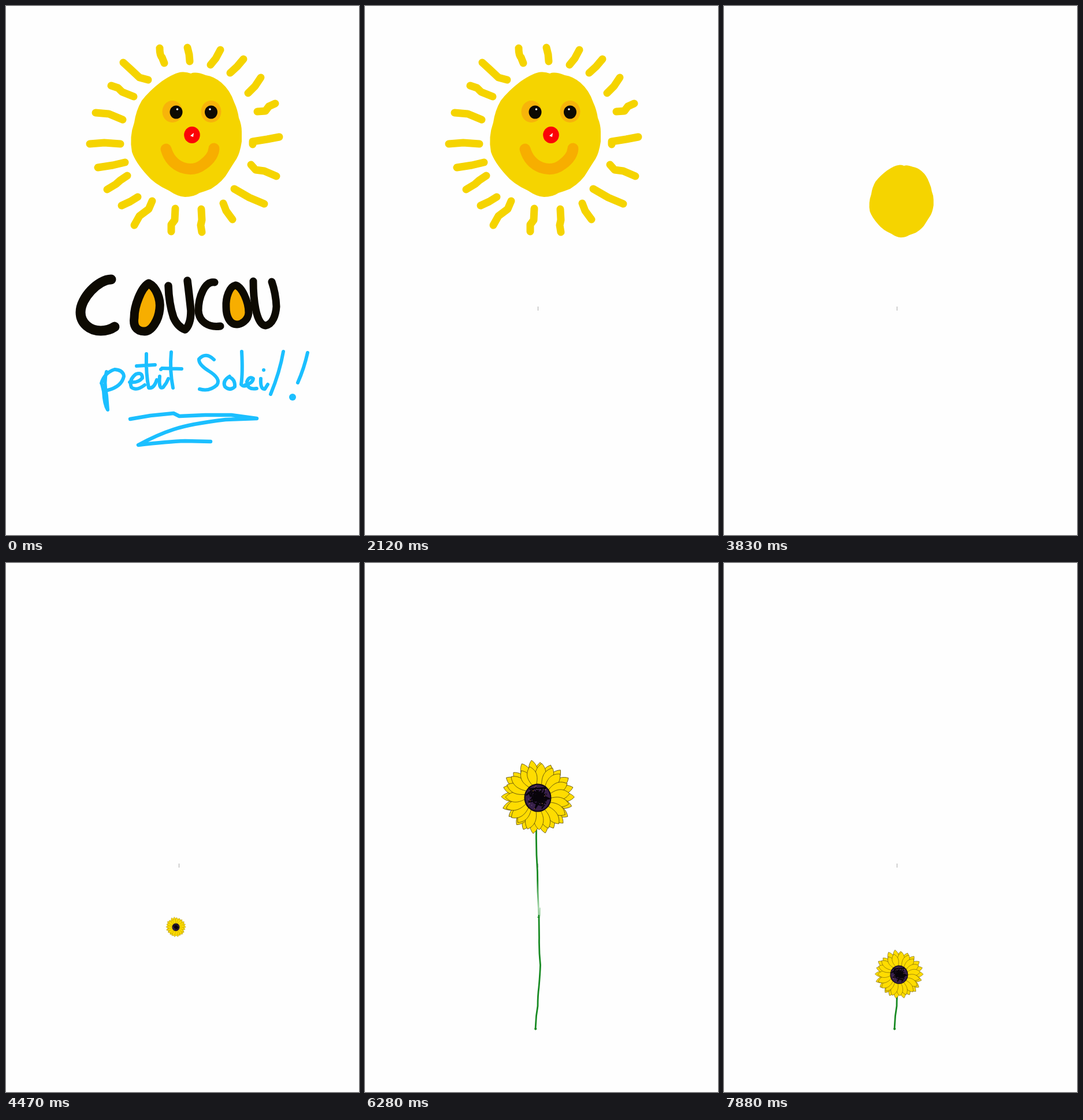
Animation of 611x917 px, one loop 7.99 s. Source, as an HTML page with a canvas:

```html
<!DOCTYPE html>
<html lang="fr">
<head>
<meta charset="utf-8">
<title>Coucou petit soleil</title>
<style>
html, body { margin: 0; width: 100%; height: 100%; overflow: hidden; background: #fefefe; }
canvas { display: block; width: 611px; height: 917px; }
</style>
</head>
<body>
<canvas id="stage" width="611" height="917"></canvas>
<script>
const ctx = document.getElementById('stage').getContext('2d');
const LOOP = 7990, STEP = LOOP / 75;
const YELLOW = '#f5d400', ORANGE = '#f7ae00', INK = '#0d0a02', BLUE = '#1bbfff', GREEN = '#178a22';

const disk = new Path2D('M305 114.5Q313 114 320 117Q328 113 346 120Q360 122 373 133Q388 146 395 167Q401 180 403 194' +
  'Q408 206 408 218V235Q405 255 399 265Q393 274 385 287Q376 304 355 317Q345 321 335 324Q325 331 310 331' +
  'Q298 331 282 320Q256 308 244 293Q224 271 218 253Q213 227 222 202Q225 181 235 164Q248 147 269 131Q292 115 305 114.5Z');

// Clockwise from the top left
const rays = [
  'M266 73Q266 86 270 89L274 99', 'M314 72L317 84L318 96', 'M371 76L363 91L354 102', 'M411 92L400 105L388 116',
  'M441 124L431 139L419 151', 'M466 169L455 174L449 182L435 183', 'M473 227L452 231L427 235L427 240',
  'M424 275L432 284L447 286L468 295', 'M395 317L421 332L447 343', 'M376 342L381 355L392 370',
  'M338 352L339 371L337 380L339 392', 'M293 351L292 371L286 379L286 391', 'M253 338L247 352L231 364L222 380',
  'M228 331L215 339L200 346', 'M210 294L198 302L190 309L175 318', 'M206 271L185 276L159 280',
  'M198 239L170 237L145 239', 'M202 197L178 187L155 185', 'M221 157L201 149L194 142L182 138', 'M246 128L231 124L215 109L203 98'
].map(d => new Path2D(d));

// path, line width, step at which it is rubbed out, filled inside
const letters = [
  ['M182 474C160 474 129 506 129 531C129 550 145 563 164 563Q178 563 188 556', 17, 19],
  ['M247 481C260 487 268 508 266 525C264 545 252 564 240 564C224 564 220 553 222 540C222 520 234 488 247 481Z', 15, 18, true],
  ['M281 485Q282 516 290 540Q297 556 310 561Q320 552 320 528Q317 500 314 476', 13.5, 17],
  ['M361 479C344 476 333 505 333 528C334 548 352 558 371 555', 13, 15],
  ['M397 484C408 486 420 512 420 532C419 546 406 552 400 552C386 552 381 536 381 522C380 505 387 486 397 484Z', 13, 13, true],
  ['M428 477C428 505 432 552 449 554C462 552 467 535 468 521Q467 498 460 478', 13, 11]
].map(([d, w, off, fill]) => ({ path: new Path2D(d), w, off, fill }));

const script = [
  ['M174 634Q169 650 174 675L176 700Q170 690 169 668Q166 655 165 654Q170 636 188 630Q203 631 204 642Q200 660 176 666', 7],
  ['M214 652Q228 654 236 645Q236 634 225 638Q212 648 217 661Q226 668 240 657', 7],
  ['M243 603Q242 638 247 662Q256 664 261 648M226 624L258 622', 7],
  ['M266 642Q264 666 272 661Q278 654 281 646M268 630h.1', 7],
  ['M286 600Q283 632 289 662M270 628L304 629', 7],
  ['M360 613Q346 599 334 612Q333 621 350 632Q373 646 365 657Q352 669 335 664', 8],
  ['M387 642Q374 650 379 660Q388 668 396 660Q397 647 386 643', 8],
  ['M408 599Q410 636 407 656Q411 661 419 657', 8],
  ['M414 657Q427 654 428 646Q421 641 417 651Q417 666 434 663', 8],
  ['M441 646Q440 665 448 664L453 656M446 631h.1', 8],
  ['M480 599Q474 634 458 673', 9],
  ['M522 601Q516 628 505 653', 10]
].map(([d, off]) => ({ path: new Path2D(d), off }));

const underline = new Path2D('M215 716L250 710L290 706L300 711L345 709L390 709L434 715L380 717Q320 724 290 734Q262 743 229 761Q280 755 310 754L354 755');
const underlineLength = 565;
const smile = new Path2D('M277 248Q284 272 305 280Q325 287 341 275Q359 262 360 247');
const brows = new Path2D('M276 158L288 147Q293 144 297 146M345 147Q360 149 368 160');
const stem = new Path2D('M295 808L296.5 785L299 768Q299 750 301 735Q303 712 303.5 697Q301 672 301.5 650L301 612L299 570L298.5 535Q296 500 296.5 466V400');

// step, x, y, radius
const track = [
  [31, 312, 222, 100], [32, 314, 226, 95], [36, 307, 338, 58], [40, 297, 516, 17], [42, 294, 631, 17],
  [44, 294, 745, 19], [46, 296, 828, 22], [48, 297, 760, 28], [50, 304, 713, 38], [53, 308.5, 643, 46],
  [56, 306, 540, 55], [59, 299, 406, 62], [65, 299, 406, 62], [68, 304, 540, 54], [72, 307, 674, 47], [74, 303, 713, 41]
];

function pose(step) {
  const i = Math.max(1, track.findIndex(k => k[0] >= step));
  const a = track[i - 1], b = track[i], p = (step - a[0]) / (b[0] - a[0]);
  return [1, 2, 3].map(j => a[j] + (b[j] - a[j]) * p);
}

function seeded(seed) {
  return () => (seed = (seed * 16807) % 2147483647) / 2147483647;
}

function stroke(path, color, width) {
  ctx.strokeStyle = color;
  ctx.lineWidth = width;
  ctx.stroke(path);
}

function dot(x, y, rx, color, ry = rx) {
  ctx.fillStyle = color;
  ctx.beginPath();
  ctx.ellipse(x, y, rx, ry, 0, 0, Math.PI * 2);
  ctx.fill();
}

function drawEye(x, px) {
  dot(x, 183, 17.5, '#f7b40a', 19);
  dot(px, 184, 11, INK, 11.5);
  dot(px + (px < 320 ? 2 : -2), 179, 1.8, '#fff');
}

function drawFace(step) {
  if (step < 24) stroke(smile, ORANGE, 19);
  if (step < 22) drawEye(288, 294.5);
  if (step < 21) drawEye(355, 355);
  if (step < 23) {
    dot(322, 223.5, 13.8, '#fb0407', 14.5);
    ctx.fillStyle = '#fff';
    ctx.fill(new Path2D('M319 225L325 220L324 227Z'));
  }
  if (step >= 5 && step < 20) stroke(brows, '#1fc0e6', 5);
}

function drawWords(step) {
  for (const l of letters) {
    if (step >= l.off) continue;
    if (l.fill) { ctx.fillStyle = ORANGE; ctx.fill(l.path); }
    stroke(l.path, INK, l.w);
  }
  for (const s of script) if (step < s.off) stroke(s.path, BLUE, 6);
  if (step < 10) dot(496, 678, 6, BLUE);
  if (step < 6) {
    ctx.setLineDash([underlineLength * (1 - step / 6), 2000]);
    stroke(underline, BLUE, 6.5);
    ctx.setLineDash([]);
  }
}

function drawSun(step) {
  rays.forEach((ray, i) => {
    if (step < 30 - i * 0.28) stroke(ray, YELLOW, 13);
  });
  ctx.fillStyle = YELLOW;
  ctx.fill(disk);
}

function petal(angle, length, width) {
  ctx.save();
  ctx.rotate(angle);
  ctx.beginPath();
  ctx.moveTo(16, 0);
  ctx.bezierCurveTo(30, -width, length - 12, -width * 1.5, length, 0);
  ctx.bezierCurveTo(length - 12, width * 1.5, 30, width, 16, 0);
  ctx.fill();
  ctx.stroke();
  ctx.restore();
}

function drawFlower(x, y, r) {
  const rnd = seeded(77);
  ctx.save();
  ctx.translate(x, y);
  ctx.scale(r / 62, r / 62);
  ctx.strokeStyle = '#5a4c10';
  ctx.lineWidth = 0.8;
  dot(0, 0, 48, '#ffdc00');
  for (const [count, reach] of [[22, 60], [19, 54]]) {
    for (let i = 0; i < count; i++) {
      petal((i + rnd() * 0.3) / count * Math.PI * 2 - 1.5, reach + rnd() * 5, 8.5 + rnd());
    }
  }

  // Scribbled heart
  dot(0, 1, 23.5, '#120a16', 24.5);
  dot(0, 1, 21.5, '#38204a', 22.5);
  ctx.strokeStyle = '#08040a';
  ctx.lineWidth = 2.4;
  for (const [turns, reach, shift] of [[45, 13, 3], [22, 21, 0]]) {
    ctx.beginPath();
    for (let i = 0; i < turns; i++) {
      const a = rnd() * 6.28, d = reach * Math.sqrt(rnd());
      ctx.lineTo(Math.cos(a) * d + shift, Math.sin(a) * d);
    }
    ctx.stroke();
  }
  for (let i = 0; i < 18; i++) {
    const a = rnd() * 6.28, d = 12 + rnd() * 9;
    dot(Math.cos(a) * d, Math.sin(a) * d + 1, 0.8, i % 2 ? '#b57a35' : '#765083');
  }
  ctx.restore();
}

function drawStem(top) {
  if (top > 806) return;
  const fade = ctx.createLinearGradient(0, 550, 0, 614);
  fade.addColorStop(0, GREEN);
  fade.addColorStop(0.75, '#a6d6ab');
  fade.addColorStop(0.93, '#8cc892');
  fade.addColorStop(0.94, GREEN);
  ctx.save();
  ctx.beginPath();
  ctx.rect(0, top, 611, 917 - top);
  ctx.clip();
  stroke(stem, fade, 2.8);
  if (top < 550) {
    stroke(new Path2D('M303 598V612'), '#9fd1a4', 1.4);
    stroke(new Path2D('M299 614H302'), GREEN, 1.4);
  }
  dot(295.3, 807.5, 2, GREEN);
  ctx.restore();
}

function draw(now) {
  const step = Math.floor((now % LOOP + 13) / STEP) % 75;
  ctx.fillStyle = '#fefefe';
  ctx.fillRect(0, 0, 611, 917);
  ctx.lineCap = ctx.lineJoin = 'round';
  if (step >= 17) {
    ctx.fillStyle = '#aaa';
    ctx.fillRect(299, 521, 1, 7);
  }
  if (step <= 31) {
    drawSun(step);
    drawFace(step);
    drawWords(step);
  } else {
    const [x, y, r] = pose(step);
    if (step < 38) {
      ctx.save();
      ctx.translate(x, y);
      ctx.scale(r / 100, r / 100);
      ctx.translate(-312, -222);
      ctx.fillStyle = YELLOW;
      ctx.fill(disk);
      ctx.restore();
    } else {
      if (step >= 47) drawStem(y);
      drawFlower(x, y, r);
    }
  }
  requestAnimationFrame(draw);
}
requestAnimationFrame(draw);
</script>
</body>
</html>
```
